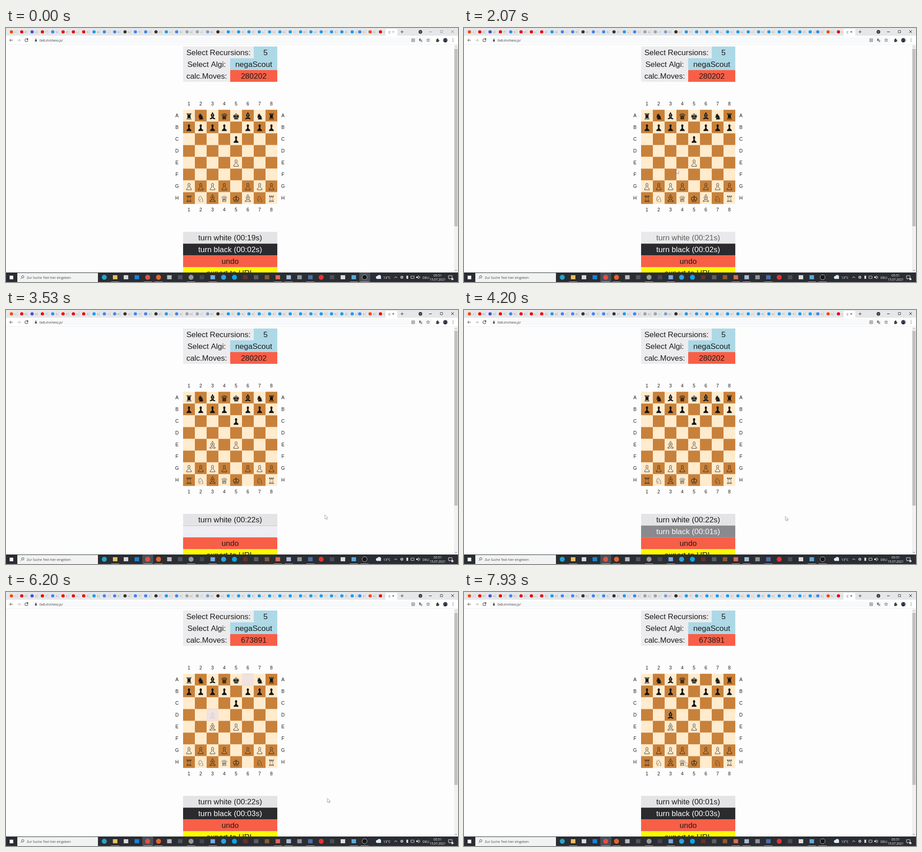
An HTML page with a canvas that plays this animation: 998x561 px, repeating every 8000 ms.

```html
<!DOCTYPE html>
<html lang="de">
<head>
<meta charset="utf-8">
<title>Chess</title>
<style>
  html, body { margin: 0; width: 100%; height: 100%; overflow: hidden; background: #fdfdfd; }
  canvas { display: block; width: 998px; height: 561px; }
</style>
</head>
<body>
<canvas id="stage" width="998" height="561"></canvas>
<script>
const ctx = document.getElementById('stage').getContext('2d');
const LOOP = 8000, FOCUS = 1500, WHITE_MOVE = 2270, BLACK_START = 2650, BLACK_MOVE = 6140;
const CELL = 26, BOARD_X = 391, BOARD_Y = 180.6, PANEL_Y = 40.9, BUTTON_Y = 450.3;
const SANS = '"Liberation Sans", Arial, sans-serif';
const UI = '"Open Sans", sans-serif';
const PANEL = '#ececee', TOMATO = '#f85f47', INK = '#15120e';

const opacityBlack = [[BLACK_START, 1], [3450, 0], [4200, .52], [4550, 1], [5130, .03], [6100, 1]];
const pointer = [[200, 792, 552], [1200, 547, 378], [1500, 535, 376], [2270, 456, 300],
  [2450, 456, 300], [2870, 482, 320], [3600, 710, 456], [6900, 710, 456], [7930, 490, 376]];

// Outlines centred on a cell
const pawn = new Path2D('M-1.2-2.6A2.4 2.4 0 1 1 1.2-2.6L2.6-1.6L1.2-.8Q1.4 2.2 3.6 3.8' +
  'L5.2 4.8V7.4H-5.2V4.8L-3.6 3.8Q-1.4 2.2-1.2-.8L-2.6-1.6Z');
const bishop = new Path2D('M-.9-6A1.2 1.2 0 1 1 .9-6Q6-1.5 2.4 2L2.8 4Q4 5.4 6 5.2L5.6 7.4' +
  'Q2 7.6 0 5.6Q-2 7.6-5.6 7.4L-6 5.2Q-4 5.4-2.8 4L-2.4 2Q-6-1.5-.9-6Z');
const bishopMarks = new Path2D('M0-4V.2M-1.8-2H1.8M-2.2 2.2H2.2');

// Eased value between the keyframes [time, ...values]
function track(keys, t) {
  const next = keys.findIndex(k => k[0] > t);
  if (next === 0) return keys[0].slice(1);
  if (next < 0) return keys[keys.length - 1].slice(1);
  const a = keys[next - 1], b = keys[next];
  const u = (t - a[0]) / (b[0] - a[0]), e = u * u * (3 - 2 * u);
  return a.slice(1).map((v, i) => v + (b[i + 1] - v) * e);
}

function step(t, first, ...changes) {
  return changes.reduce((value, [at, next]) => t >= at ? next : value, first);
}

function rect(x, y, w, h, color) {
  ctx.fillStyle = color;
  ctx.fillRect(x, y, w, h);
}

function disc(x, y, r, color) {
  ctx.fillStyle = color;
  ctx.beginPath();
  ctx.arc(x, y, r, 0, 7);
  ctx.fill();
}

function lines(points, color, width = 1, close = false) {
  ctx.strokeStyle = color;
  ctx.lineWidth = width;
  ctx.beginPath();
  points.forEach(([x, y]) => ctx.lineTo(x, y));
  if (close) ctx.closePath();
  ctx.stroke();
}

function text(str, x, y, size, color = '#1c1c1c', align = 'center', family = SANS) {
  ctx.font = `${size}px ${family}`;
  ctx.fillStyle = color;
  ctx.textAlign = align;
  ctx.fillText(str, x, y);
}

function box(x, y, w, color, label, ink) {
  rect(x, y, w, CELL, color);
  text(label, x + w / 2, y + 19, 17, ink);
}

// Fades what is already drawn in an area towards the colour behind it
function veil(x, y, w, h, color, opacity) {
  ctx.globalAlpha = 1 - opacity;
  rect(x, y, w, h, color);
  ctx.globalAlpha = 1;
}

function cross(x, y, r, color) {
  lines([[x - r, y - r], [x + r, y + r]], color);
  lines([[x - r, y + r], [x + r, y - r]], color);
}

function drawTabs(t) {
  const ink = t < FOCUS ? '#8d8f92' : '#222';
  const palette = { r: '#ff4500', R: '#f00000', m: '#4b4bd8', g: '#4285f4', w: '#333',
    t: '#1d9bf0', s: '#a0a4a8', k: '#7b9fd0', d: '#3a2a1c' };
  const icons = 'rRmRgRRRtggwggwtgsskdtttttttttttttgrR';
  const letters = 'rUSLGDTZS';
  rect(0, 0, 998, 17, '#e5e7e9');
  [...icons].forEach((key, i) => {
    const x = 12 + i * 22.8 - (i > 33 ? 6 : 0);
    disc(x, 8.5, 3.6, palette[key]);
    text(letters[i * 5 % 9], x + 8.5, 11, 6, '#777', 'center', UI);
    rect(x + 12, 4, .6, 9, '#b5b8bc');
  });
  rect(838, 2, 26, 15, '#fff');
  text('C', 847, 11.5, 7, '#333', 'center', UI);
  cross(855, 8.5, 1.8, ink);
  lines([[871, 8.5], [878, 8.5]], '#444');
  lines([[874.5, 5], [874.5, 12]], '#444');
  disc(915, 8.5, 4, '#333');
  lines([[913.3, 7.7], [915, 9.5], [916.7, 7.7]], '#fff');
  lines([[934, 8.5], [940, 8.5]], ink);
  lines([[959, 5.5], [964, 5.5], [964, 10.5], [959, 10.5]], ink, .8, true);
  cross(986, 8, 3, ink);
}

function drawToolbar() {
  rect(0, 17, 998, 20, '#fff');
  rect(57, 20, 884, 14, '#f8f9fa');
  rect(0, 36.5, 998, .5, '#ddd');
  lines([[15, 27], [8, 27], [11, 24]], '#444');
  lines([[8, 27], [11, 30]], '#444');
  lines([[25, 27], [32, 27], [29, 24]], '#aaa');
  lines([[32, 27], [29, 30]], '#aaa');
  ctx.strokeStyle = '#444';
  ctx.lineWidth = 1.1;
  ctx.beginPath();
  ctx.arc(45, 27, 3.2, 0, 5.2);
  ctx.stroke();
  rect(46, 23, 3, 3, '#444');
  rect(64, 26, 4, 4, '#555');
  lines([[65, 26], [65, 24], [67, 24], [67, 26]], '#555', .8);
  text('0x8.ch/chess.js/', 74, 29.5, 7, '#333', 'left', UI);
  lines([[896, 24], [902, 24], [902, 30], [896, 30]], '#555', 1, true);
  rect(898, 26, 2, 2, '#555');
  rect(912, 23.5, 4, 5, '#777');
  rect(915, 26, 4, 5, '#aaa');
  const star = Array.from({ length: 10 }, (_, i) => {
    const r = i % 2 ? 1.6 : 3.8, a = i * Math.PI / 5;
    return [932 + r * Math.sin(a), 27 - r * Math.cos(a)];
  });
  lines(star, '#555', .8, true);
  rect(950, 25, 5, 6, '#444');
  disc(953, 24.5, 1.4, '#444');
  disc(955.5, 28, 1.4, '#444');
  disc(970, 27, 5, '#4d5360');
  disc(970, 25.6, 1.7, '#1f232b');
  rect(967.5, 28, 5, 3, '#1f232b');
  [24, 27, 30].forEach(y => disc(987, y, .8, '#444'));
}

function drawScrollbar(t) {
  rect(989, 37, 9, 503, '#f1f1f1');
  rect(990, 46, 7, step(t, 392, [WHITE_MOVE, 386], [BLACK_MOVE, 380]), '#c1c1c1');
  lines([[991.5, 42.5], [993.5, 40.5], [995.5, 42.5]], '#888');
  lines([[991.5, 534.5], [993.5, 536.5], [995.5, 534.5]], '#555');
}

function position(t) {
  const rows = ['♜♞♝♛♚♝♞♜', '♟♟♟♟ ♟♟♟', '    ♟   ', '        ',
    '    ♙   ', '        ', '♙♙♙♙ ♙♙♙', '♖♘♗♕♔♗♘♖'].map(r => [...r]);
  const move = (r0, c0, r1, c1) => {
    rows[r1][c1] = rows[r0][c0];
    rows[r0][c0] = ' ';
  };
  if (t >= WHITE_MOVE) move(7, 5, 4, 2);
  if (t >= BLACK_MOVE) move(0, 5, 3, 2);
  return rows;
}

function drawPiece(glyph, cx, cy) {
  ctx.fillStyle = ctx.strokeStyle = INK;
  if ('♟♙♝♗'.includes(glyph)) {
    const black = '♟♝'.includes(glyph), isBishop = '♝♗'.includes(glyph);
    const shape = isBishop ? bishop : pawn;
    ctx.save();
    ctx.translate(cx, cy + .5);
    ctx.lineWidth = .8;
    if (black) ctx.fill(shape);
    else ctx.stroke(shape);
    if (black) ctx.strokeStyle = '#d8d0c4';
    if (isBishop) ctx.stroke(bishopMarks);
    ctx.restore();
    return;
  }
  ctx.font = '18.5px "DejaVu Sans", sans-serif';
  ctx.textAlign = 'center';
  const { actualBoundingBoxDescent: descent } = ctx.measureText(glyph);
  ctx.fillText(glyph, cx, cy + 8 - descent);
}

function drawBoard(t) {
  const changed = t >= BLACK_MOVE ? ['0,5', '3,2'] : t >= WHITE_MOVE ? ['7,5', '4,2'] : [];
  const fade = Math.min(1, (t - (t >= BLACK_MOVE ? BLACK_MOVE : WHITE_MOVE)) / 550);
  position(t).forEach((row, r) => row.forEach((glyph, c) => {
    const x = BOARD_X + c * CELL, y = BOARD_Y + r * CELL;
    rect(x, y, CELL, CELL, (r + c) % 2 ? '#c8813a' : '#ffebcd');
    if (glyph !== ' ') drawPiece(glyph, x + 13, y + 13);
    if (changed.includes(`${r},${c}`)) veil(x, y, CELL, CELL, '#f6eef4', fade);
  }));
  for (let i = 0; i < 8; i++) {
    const x = BOARD_X + 13 + i * CELL, y = BOARD_Y + 16.5 + i * CELL;
    [171.2, 405.2].forEach(labelY => text(i + 1, x, labelY, 10.4));
    [377.5, 611.5].forEach(labelX => text('ABCDEFGH'[i], labelX, y, 10.4));
  }
}

function drawPanels(t) {
  const [row1, row2, row3] = [0, 1, 2].map(i => PANEL_Y + i * CELL);
  box(391, row1, 156, PANEL, 'Select Recursions:');
  box(547, row1, 52, '#add8e6', '5');
  box(391, row2, 104, PANEL, 'Select Algi:');
  box(495, row2, 104, '#add8e6', 'negaScout');
  box(391, row3, 104, PANEL, 'calc.Moves:');
  box(495, row3, 104, TOMATO, step(t, 280202, [4650, 245547], [6100, 673891]));
}

function drawButtons(t) {
  const whiteTime = step(t, '19', [300, '20'], [1300, '21'], [2260, '22'], [7200, '01']);
  const blackTime = step(t, '02', [3000, '00'], [3650, '01'], [4650, '02'], [5650, '03']);
  const pulse = elapsed => .5 + .5 * Math.cos(elapsed / 1740 * 2 * Math.PI);
  const whiteOpacity = t < WHITE_MOVE ? pulse(t) : t < 6200 ? 1 : pulse(t - 6200);
  const [white, black, undo, share] = [0, 1, 2, 3].map(i => BUTTON_Y + i * CELL);

  box(391, white, 208, '#e4e4e6', `turn white (00:${whiteTime}s)`);
  veil(391, white, 208, CELL, '#f3f3f6', whiteOpacity);
  box(391, black, 208, '#2b2b2e', `turn black (00:${blackTime}s)`, '#fff');
  veil(391, black, 208, CELL, '#f0f0f6', track(opacityBlack, t)[0]);
  box(391, undo, 208, TOMATO, 'undo');
  box(391, share, 208, '#fffa00', 'export to URL');
}

function drawTaskbar(t) {
  rect(0, 540, 998, 21, '#2a2d33');
  rect(8, 547, 8, 8, '#fff');
  rect(25, 541, 178, 20, '#f1f2f2');
  ctx.strokeStyle = '#333';
  ctx.lineWidth = .9;
  ctx.beginPath();
  ctx.arc(37, 549.5, 2.6, 0, 7);
  ctx.stroke();
  lines([[35, 551.5], [32.5, 554]], '#333', .9);
  text('Zur Suche Text hier eingeben', 46, 553.5, 7.2, '#444', 'left', UI);

  rect(t < FOCUS ? 780 : 301, 540, 24, 21, '#4a5059');
  const icons = ['#22a5c8', '#e8c060', '#d8d8d8', '#1683d8', '#de5246', '#e8622c', '#b8babc',
    '#50545a', '#989898', '#44484c', '#7aa9e0', '#2ba3df', '#0aa5e8', '#6a2f28', '#5a5e62',
    '#8a5a30', '#d86a58', '#a8bcd8', '#8b9396', '#4a6fa8', '#e03434', '#4a4e54', '#dcdcdc',
    '#5aa9dc', '#15171a'];
  const round = [0, 4, 5, 8, 11, 12, 20, 24], open = [1, 4, 5, 8, 10, 16, 17, 19, 23, 24];
  icons.forEach((color, i) => {
    const x = 217 + i * 23.95;
    if (round.includes(i)) disc(x, 550.5, 5.5, color);
    else rect(x - 5, 546, 10, 9, color);
    if (open.includes(i)) rect(x - 9, 560, 18, 1, '#76b9ed');
  });
  ctx.strokeStyle = '#ccc';
  ctx.beginPath();
  ctx.arc(791.8, 550.5, 5.5, 0, 7);
  ctx.stroke();

  disc(820, 551, 3.2, '#d9ecf8');
  disc(824, 549.5, 4, '#d9ecf8');
  rect(820, 550, 8, 4.2, '#d9ecf8');
  text('13°C', 841, 553.5, 7.2, '#fff', 'center', UI);
  lines([[857.5, 552], [860.5, 549], [863.5, 552]], '#fff');
  disc(874, 550.5, 3, '#d5d7da');
  disc(874, 550.5, 1.3, '#2a2d33');
  rect(884, 547, 4, 7, '#d5d7da');
  lines([[894, 548], [901, 548], [901, 553], [894, 553]], '#fff', .8, true);
  rect(906, 549, 3, 3, '#fff');
  lines([[909, 549], [911, 547], [911, 554], [909, 552]], '#fff', .8);
  lines([[913, 548], [914, 550.5], [913, 553]], '#fff', .8);
  text('DEU', 927, 553.5, 7.2, '#fff', 'center', UI);
  text('05:51', 953, 548.5, 7, '#fff', 'center', UI);
  text('15.07.2021', 953, 558, 7, '#fff', 'center', UI);
  lines([[977, 547], [985, 547], [985, 553], [981, 553], [979, 555], [979, 553], [977, 553]],
    '#fff', .9, true);
  disc(985.5, 554.5, 2.5, '#d7d9dc');
}

function drawPointer(t) {
  if (t < pointer[0][0]) return;
  const [x, y] = track(pointer, t);
  const shape = [[0, 0], [0, 8.5], [2, 6.8], [3.4, 10], [4.7, 9.4], [3.4, 6.3], [6, 6.2]];
  lines(shape.map(([dx, dy]) => [x + dx, y + dy]), '#333', .9, true);
  ctx.fillStyle = '#fff';
  ctx.fill();
}

function draw(now) {
  const t = now % LOOP;
  rect(0, 0, 998, 561, '#fdfdfd');
  drawTabs(t);
  drawToolbar();
  drawPanels(t);
  drawBoard(t);
  drawButtons(t);
  drawScrollbar(t);
  drawTaskbar(t);
  drawPointer(t);
  requestAnimationFrame(draw);
}
requestAnimationFrame(draw);
</script>
</body>
</html>
```
